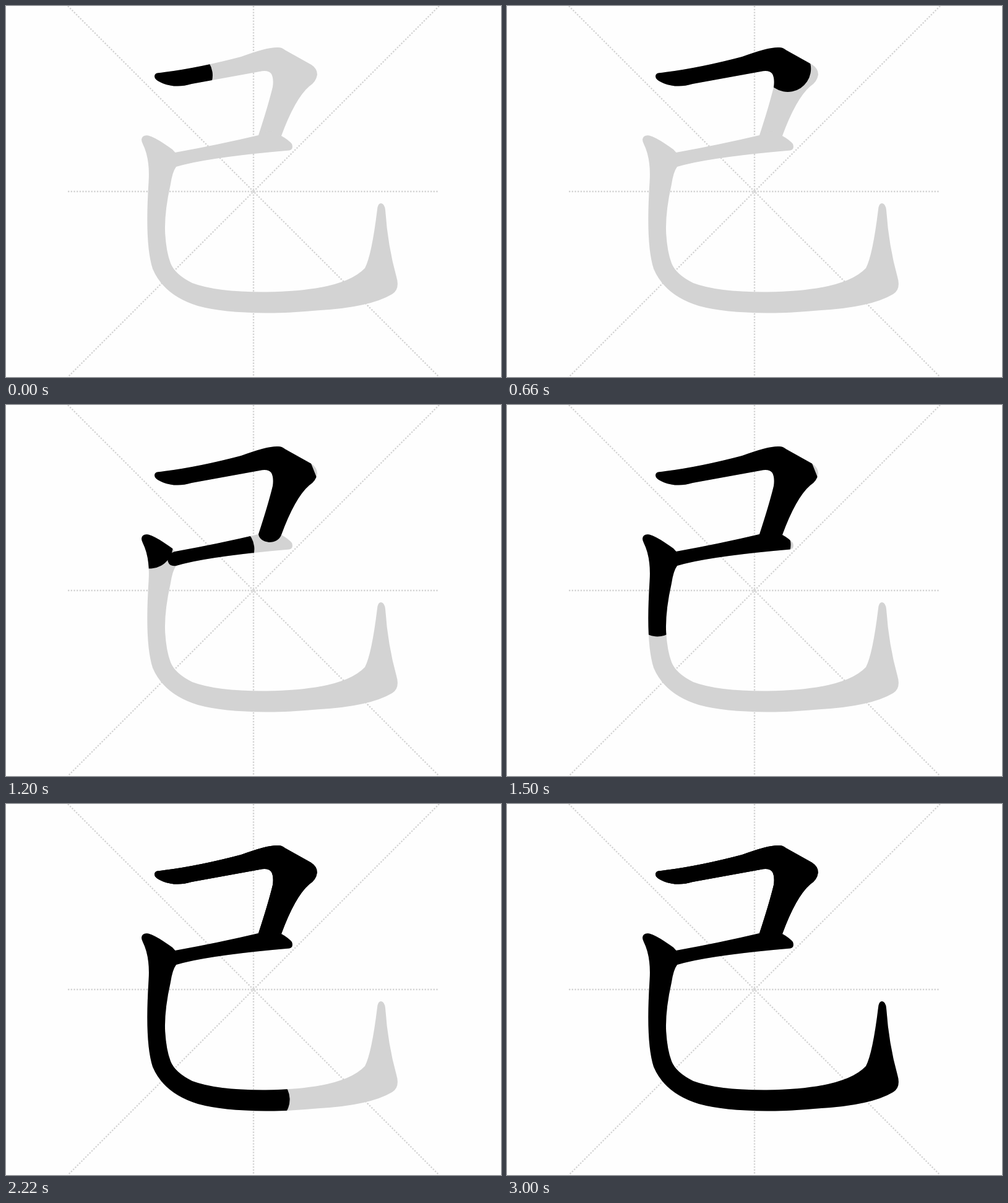
These frames come from a looping animation (800 by 600 pixels, 3.06 s). An HTML page:

```html
<!DOCTYPE html>
<html lang="zh">
<head>
<meta charset="utf-8">
<title>Stroke order</title>
<style>
  html, body { margin: 0; width: 100%; height: 100%; overflow: hidden; background: #fefefe; }
  svg { display: block; width: 800px; height: 600px; }
  .grid { stroke: #d3d3d3; stroke-width: 1; stroke-dasharray: 1 1; }
  .base { fill: #d3d3d3; }

  /* Each pen line grows at a constant speed: offset = 2000 - drawn length */
  .pen {
    fill: none; stroke: #000; stroke-width: 75; stroke-linecap: round;
    stroke-dasharray: 2000 2000;
    animation: draw 3.06s steps(51, end) infinite;
  }
  @keyframes draw {
    from { stroke-dashoffset: calc(2000px - var(--drawn)); }
    to { stroke-dashoffset: calc(2000px - var(--drawn) - 51 * var(--speed)); }
  }

  #pen1 { --drawn: 47px; --speed: 14.85px; }
  #pen2 { --drawn: -137.4px; --speed: 11.52px; }
  #pen3 { --drawn: -440px; --speed: 22.68px; }

  /* The outer corner of the first stroke fills in late */
  .corner { animation: fill 3.06s step-end infinite; }
  @keyframes fill {
    0% { visibility: hidden; }
    72.54%, 100% { visibility: visible; }
  }
</style>
</head>
<body>
<svg viewBox="0 0 800 600">
  <defs>
    <path id="s1" d="M246 108.3Q306 101.5 380 82Q423 66 440 67Q446 67 451 71.3L493.5 95Q503 101 503 111Q501 123 490 130Q467 150 445 210Q440 222 425 222Q410 220 408 209Q424 160 431 131Q433 118 429 110Q424 103 410 106L300 126Q275 133.5 253 125Q240 119.5 240 114Q240 109 246 108.3Z"/>
    <path id="s2" d="M273 237Q345 224 408 209Q430 197 445 210Q456 216 462 223Q465 232 458 233.5Q325 245 275 260Q262 262 261 249Q261 240 273 237Z"/>
    <path id="s3" d="M219 216Q220 208 230 209.5Q243 213 269 232L273.5 237L275 260Q269 268 266 288Q255.5 335 257.2 368Q259 398 266 416Q273 434 301 448Q341 463 420 462.5Q545 461 580 424Q591 403 600 329Q601 319 606 319Q612 320 613 330Q617 388 631 438Q637 458 624 466Q589 487 508 492Q450 497 420 496.5Q350 496 310 485Q255 468 237 425Q224 385 230.5 285Q233 247 221 223Q219 219 219 216Z"/>
    <clipPath id="c1"><use href="#s1"/></clipPath>
    <clipPath id="c2"><use href="#s2"/></clipPath>
    <clipPath id="c3"><use href="#s3"/></clipPath>
  </defs>

  <!-- 256 units fill the stage height -->
  <g class="grid" transform="translate(100) scale(2.34375)">
    <path d="M0 0L256 256"/>
    <path d="M256 0L0 256"/>
    <path d="M128 0V256"/>
    <path d="M0 128H256"/>
  </g>

  <g class="base">
    <use href="#s1"/>
    <use href="#s2"/>
    <use href="#s3"/>
  </g>

  <g clip-path="url(#c1)">
    <path class="pen" id="pen1" d="M250 119L296.5 112L400 91L432 88L453 101L456 103L462.8 120L447.4 155L436 185L430 215"/>
  </g>
  <g clip-path="url(#c2)">
    <path class="pen" id="pen2" d="M272 247L306.7 240L421.5 226L465 222"/>
  </g>
  <g clip-path="url(#c3)">
    <path class="pen" id="pen3" d="M226 215L245 250L247 290L243 337L246 395L258 432L295 462L350 474L420.5 478L500 475L578 457L597 446L606 420V325"/>
  </g>
  <use class="corner" href="#s1"/>
</svg>
</body>
</html>
```
